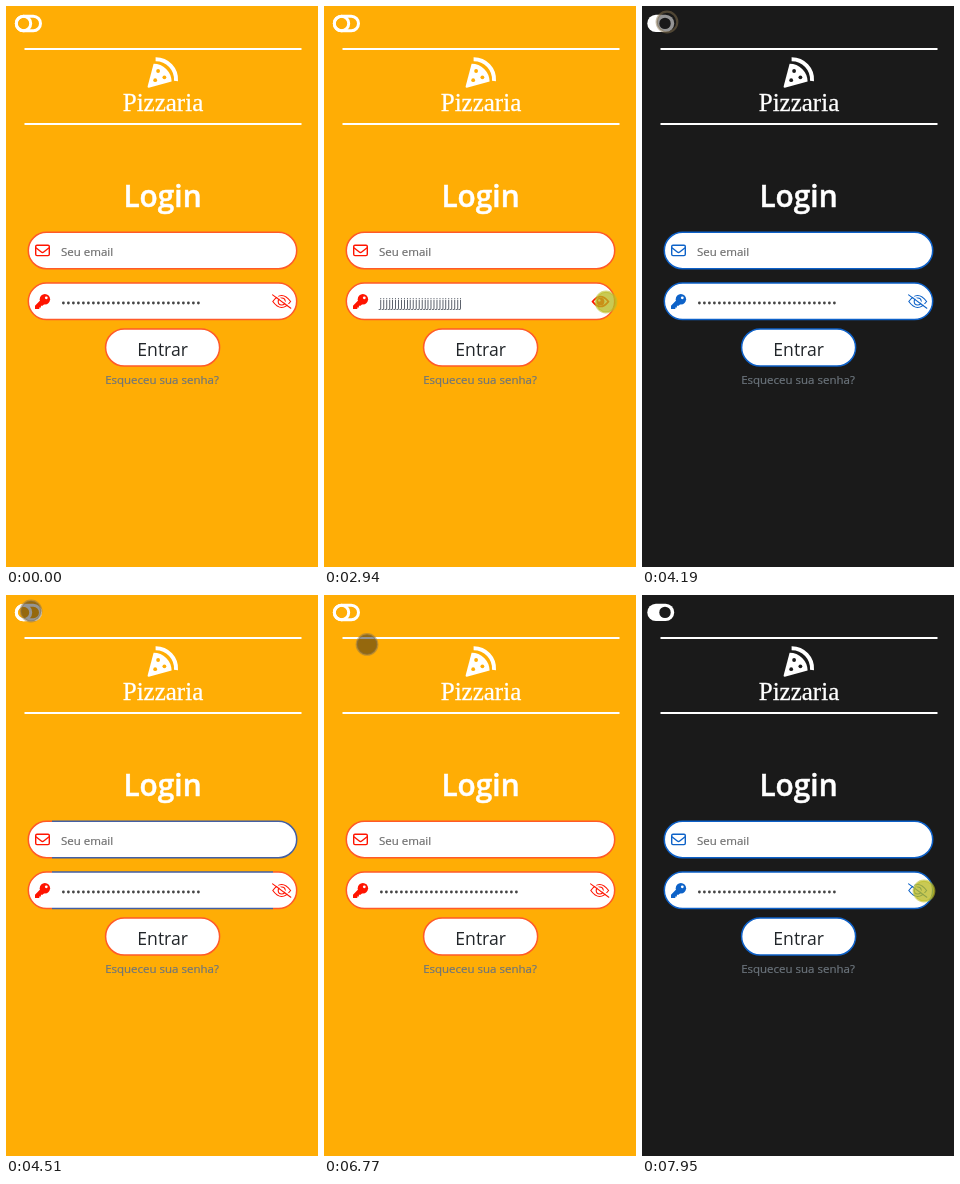
An HTML page that plays this animation: 312 px wide and 561 px high, repeating every 8 s.

```html
<!DOCTYPE html>
<html lang="pt">
<head>
<meta charset="utf-8">
<title>Login</title>
<style>
  html, body { margin: 0; width: 100%; height: 100%; overflow: hidden; }
  svg { display: block; width: 100vw; height: 100vh; }
  text { font-family: "Open Sans", "Noto Sans", sans-serif; }
  .bg { fill: var(--bg); }
  .icon { fill: var(--accent); }
  .line { fill: none; stroke: var(--accent); }
  .edge, .mid { fill: none; stroke: var(--edge); stroke-width: 1.5; }
  .mid { stroke: var(--mid); }
  .small { font-size: 11.5px; stroke-width: .2; }
</style>
</head>
<body>
<svg viewBox="0 0 312 561" preserveAspectRatio="none">
  <rect class="bg" width="312" height="561"/>

  <g id="off" fill="none" stroke="#fff" stroke-width="3">
    <rect x="10.3" y="10.3" width="24.2" height="14.4" rx="7.2"/>
    <circle cx="17.5" cy="17.5" r="7.2"/>
  </g>
  <g id="on">
    <rect x="5.3" y="8.8" width="26.9" height="17.2" rx="8.6" fill="#fff"/>
    <circle class="bg" cx="23" cy="17.4" r="5.7"/>
  </g>

  <path d="M18.5 43H295.5M18.5 118H295.5" stroke="#fff" stroke-width="2.2"/>
  <g id="pizza">
    <path d="M147.6 57.8A18.2 18.2 0 0 1 165.6 75.5L142.8 81.7Q141.3 81.8 141.6 80.6z" fill="#fff"/>
    <path d="M149.6 53.2A20.3 20.3 0 0 1 170 75" fill="none" stroke="#fff" stroke-width="4"/>
    <circle class="bg" cx="149.2" cy="74.2" r="1.9"/>
    <circle class="bg" cx="152.1" cy="65" r="1.9"/>
    <circle class="bg" cx="158.4" cy="71.3" r="1.9"/>
  </g>
  <g fill="#fff" stroke="#fff" text-anchor="middle">
    <text x="157" y="105" font-size="25" stroke-width=".3" style="font-family:'Liberation Serif',serif">Pizzaria</text>
    <text x="156.5" y="201" font-size="29.8" font-weight="600" stroke-width=".5">Login</text>
  </g>

  <g fill="#fff">
    <rect x="22.3" y="226.3" width="268.4" height="36.4" rx="18.2"/>
    <rect x="22.3" y="277.1" width="268.4" height="36.4" rx="18.2"/>
    <rect x="99.6" y="322.9" width="114" height="37.2" rx="18.6"/>
  </g>
  <path class="edge" d="M46 226.3H40.5a18.2 18.2 0 0 0 0 36.4H46M46 277.1H40.5a18.2 18.2 0 0 0 0 36.4H46M267 277.1H272.5a18.2 18.2 0 0 1 0 36.4H267"/>
  <path class="mid" d="M46 226.3H272.5a18.2 18.2 0 0 1 0 36.4H46M46 277.1H267M46 313.5H267"/>
  <rect class="edge" x="99.6" y="322.9" width="114" height="37.2" rx="18.6"/>

  <g class="line" stroke-width="1.4" stroke-linejoin="round">
    <rect x="29.7" y="239.2" width="13.6" height="10.4" rx="1.3"/>
    <path d="M29.9 241.8l5.4 4.2q1.2 .9 2.4 0l5.4-4.2"/>
  </g>
  <text class="small" x="55" y="249.8" fill="#6e6e6e" stroke="#6e6e6e">Seu email</text>

  <g class="icon">
    <circle cx="38.9" cy="293.2" r="5.2"/>
    <path d="M34.6 294.1L29 299.8V303h4.3v-1.6h1.6v-1.7h1.7l2.4-2.4z"/>
    <circle cx="40.3" cy="291.8" r="1.4" fill="#fff"/>
  </g>
  <path id="dots" d="M57.4 297h136" stroke="#444" stroke-width="2.8" stroke-linecap="round" stroke-dasharray="0 5"/>
  <text id="plain" x="55.3" y="300.6" font-size="11.7" fill="#555b66"></text>

  <g id="closed" class="line" stroke-width="1.1" stroke-linecap="round">
    <path d="M266.8 295.5Q275.6 283.5 284.6 295.5Q275.6 307.5 266.8 295.5z"/>
    <circle cx="275.7" cy="295.5" r="3.5"/>
    <path d="M267.6 287.8L285.6 301" stroke="#fff" stroke-width="1.4"/>
    <path d="M266.6 288.9L284.8 302.2"/>
  </g>
  <g id="open">
    <path class="line" stroke-width="1.7" d="M268.6 295.6Q276.5 285.8 284.4 295.6Q276.5 305.4 268.6 295.6z"/>
    <circle class="icon" cx="276.5" cy="295.6" r="3.9"/>
    <circle cx="275.3" cy="294.4" r="1.2" fill="#fff"/>
  </g>

  <text x="156.6" y="349.6" font-size="17.6" text-anchor="middle" fill="#212529">Entrar</text>
  <text class="small" x="156" y="378" text-anchor="middle" fill="#6c757d" stroke="#6c757d">Esqueceu sua senha?</text>

  <circle id="cursor" r="10.3" stroke-width="2.2"/>
</svg>

<script>
const LOOP = 8000, PRESS = 150, FADE = 150;
const $ = id => document.getElementById(id);
const svg = document.querySelector('svg');

const RED = [255, 90, 40], BLUE = [13, 96, 200];
const flips = [4030, 4465, 7150];               // theme switches
const reveals = [2390, 3020, 5480, 6230, 8100]; // password shown, hidden, ...

const START = [287, 411], TOGGLE = [25, 16], EYE = [282, 296];
const glides = [
  { from: 130, to: 870, at: TOGGLE },
  { from: 1500, to: 1770, at: [281, 264] },
  { from: 1900, to: 2010, at: EYE },
  { from: 3200, to: 3860, at: TOGGLE },
  { from: 4530, to: 4990, at: EYE },
  { from: 6330, to: 6930, at: TOGGLE },
  { from: 7080, to: 7160, at: [27, 38] },
  { from: 7160, to: 7870, at: EYE }
];

const clamp = v => Math.min(1, Math.max(0, v));
const lerp = (a, b, p) => a + (b - a) * p;
const easeOut = (p, k) => 1 - (1 - p) ** k;
const smooth = p => p * p * (3 - 2 * p);
const rgb = c => `rgb(${c.map(Math.round)})`;
const mix = (a, b, p) => rgb(a.map((v, i) => lerp(v, b[i], p)));
const show = (id, on) => $(id).setAttribute('display', on ? 'inline' : 'none');
const isOdd = (times, t) => times.filter(v => v <= t).length % 2 === 1;

// The two axes ease differently, which bows the path slightly.
function cursorAt(t) {
  return glides.reduce(([x, y], { from, to, at }) => {
    const p = clamp((t - from) / (to - from));
    return [lerp(x, at[0], easeOut(p, 2)), lerp(y, at[1], easeOut(p, 1.6))];
  }, START);
}

function drawCursor(t) {
  show('cursor', t >= glides[0].from);
  const [x, y] = cursorAt(t), c = $('cursor');
  const pressed = [...flips, ...reveals].some(v => t >= v - PRESS && t < v);
  c.setAttribute('cx', x);
  c.setAttribute('cy', y);
  c.setAttribute('fill', pressed ? 'rgba(184,184,30,.76)' : 'rgba(24,24,24,.46)');
  c.setAttribute('stroke', pressed ? 'rgba(190,190,40,.6)' : 'rgba(135,115,80,.5)');
}

function draw(t) {
  const dark = isOdd(flips, t), shown = isOdd(reveals, t);
  const since = t - (flips.filter(v => v <= t).pop() ?? -LOOP);
  const now = dark ? BLUE : RED, before = dark ? RED : BLUE;
  const vars = {
    bg: dark ? '#1a1a1a' : '#ffad05',
    accent: dark ? '#0d62c8' : '#ff1400',
    edge: rgb(now),
    mid: mix(before, now, smooth(clamp(since / FADE)))
  };
  for (const name in vars) svg.style.setProperty('--' + name, vars[name]);

  show('on', dark);
  show('off', !dark);
  for (const id of ['plain', 'open']) show(id, shown);
  for (const id of ['dots', 'closed']) show(id, !shown);
  drawCursor(t);
}

$('plain').textContent = 'j'.repeat(28);
const start = performance.now();
(function tick() {
  draw((performance.now() - start) % LOOP);
  requestAnimationFrame(tick);
})();
</script>
</body>
</html>
```
